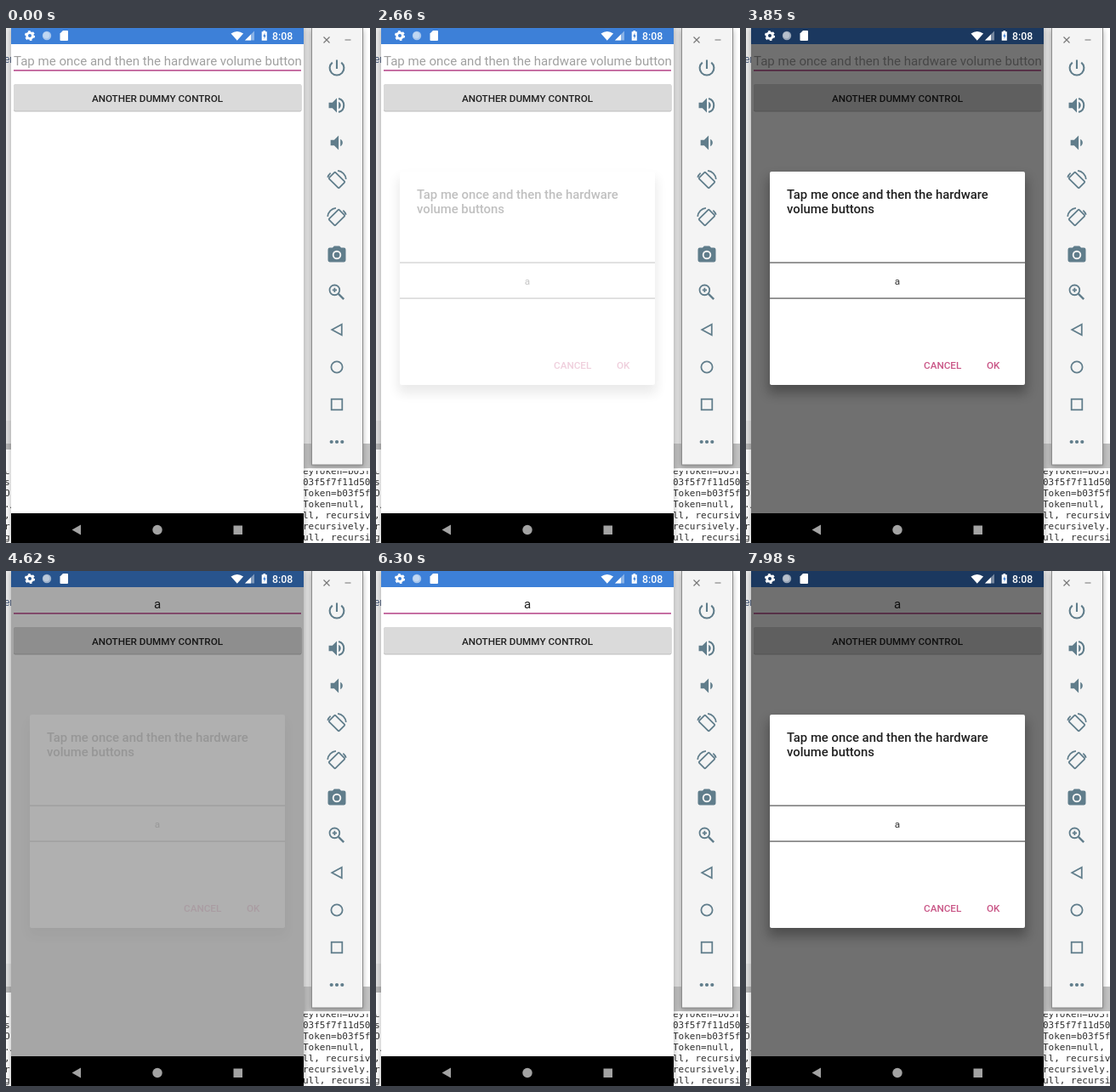
Write an HTML page that moves like this. It is 428 px wide and 606 px high and loops after 8000 ms.

```html
<!DOCTYPE html>
<html lang="en">
<head>
<meta charset="utf-8">
<title>Emulator dialog</title>
<style>
  html, body { margin: 0; width: 100%; height: 100%; overflow: hidden; background: #fff; }
  svg { display: block; width: 428px; height: 606px; }
  text { font-family: Roboto, sans-serif; white-space: pre; }
  .field { font-size: 15.05px; }
  .label { font-size: 11.7px; font-weight: 500; }
  .title { font-size: 14.85px; font-weight: 500; fill: #212121; }
  .accent { fill: #c95586; }
  .log text { font: 11px "DejaVu Sans Mono", monospace; fill: #303030; }
  .line { fill: none; stroke: #607d8b; stroke-width: 1.7; }
  .solid { fill: #607d8b; }
</style>
</head>
<body>
<svg viewBox="0 0 428 606">
  <defs>
    <filter id="soft" x="-20%" y="-20%" width="140%" height="140%"><feGaussianBlur stdDeviation="7"/></filter>
    <filter id="near" x="-30%" y="-10%" width="160%" height="120%"><feGaussianBlur stdDeviation="3"/></filter>
    <clipPath id="fieldClip"><rect x="9" y="20" width="338.5" height="40"/></clipPath>
    <clipPath id="logClip"><rect y="521" width="428" height="85"/></clipPath>
  </defs>

  <!-- Windows behind the emulator -->
  <rect width="428" height="606" fill="#fff"/>
  <rect width="6" height="489" fill="#ececec"/>
  <rect x="350" width="10" height="489" fill="#e6e6e6"/>
  <rect y="462" width="6" height="27" fill="#e0e0e0"/>
  <rect y="489" width="6" height="7" fill="#b8b8b8"/>
  <rect x="350" y="489" width="78" height="29" fill="#c2c2c2"/>
  <text x="-2" y="41" font-size="12" fill="#4a5c7c">er</text>
  <g class="log" id="log" clip-path="url(#logClip)"></g>
  <rect x="4.5" y="0" width="347" height="606" fill="#000" opacity=".22" filter="url(#near)"/>

  <!-- Device screen -->
  <rect x="6" width="344" height="606" fill="#fff"/>
  <rect x="6" width="344" height="19" fill="#3d80d8"/>
  <g clip-path="url(#fieldClip)">
    <text id="hint" class="field" x="9" y="43.5" fill="#a0a0a0">Tap me once and then the hardware volume buttons</text>
  </g>
  <text id="value" class="field" x="178" y="43.5" text-anchor="middle" fill="#222">a</text>
  <rect x="9" y="49" width="338" height="1.8" fill="#c0609a"/>
  <rect x="9" y="66.5" width="338.5" height="32" rx="2" fill="#bdbdbd"/>
  <rect x="9" y="66" width="338.5" height="31.5" rx="2" fill="#dadada"/>
  <text class="label" x="178" y="86.5" text-anchor="middle" fill="#222">ANOTHER DUMMY CONTROL</text>
  <rect id="dim" x="6" width="344" height="571"/>

  <!-- Status icons -->
  <g fill="#fff">
    <circle cx="28" cy="9" r="3.4" fill="none" stroke="#fff" stroke-width="2.8"/>
    <circle cx="28" cy="9" r="5.2" fill="none" stroke="#fff" stroke-width="1.8" stroke-dasharray="2.72"/>
    <circle cx="48" cy="9" r="5.2" opacity=".55"/>
    <circle cx="47.5" cy="8.5" r="3.8" opacity=".3"/>
    <path d="M67 3h5q1 0 1 1v10q0 1-1 1h-7.500q-1 0-1-1V6.500z"/>
    <path d="M264.500 6.500q7.300-5 14.600 0L271.800 14.800z"/>
    <path d="M281 14.500L292 3.500v11z" opacity=".4"/>
    <path d="M281 14.500l7-7v7z"/>
    <path d="M302.500 3h2.500v1.200h1.800v10.600h-6.100V4.200h1.800z"/>
    <text x="313" y="13.500" font-size="12.300" font-weight="500">8:08</text>
  </g>
  <path d="M304.300 5.500l-2 4.500h1.300v3l2-4.500h-1.300z" fill="#3d80d8"/>

  <!-- Dialog -->
  <g id="dialog">
    <rect x="26" y="176" width="304" height="254" fill="#000" opacity=".3" filter="url(#soft)"/>
    <rect x="28" y="169" width="300" height="251" rx="2" fill="#fff"/>
    <text class="title" x="48" y="200.5">Tap me once and then the hardware</text>
    <text class="title" x="48" y="218">volume buttons</text>
    <path d="M28 276.200h300M28 318.200h300" stroke="#888" stroke-width="1.7"/>
    <text x="178" y="302" font-size="11.7" text-anchor="middle" fill="#333">a</text>
    <text class="label accent" x="209" y="401">CANCEL</text>
    <text class="label accent" x="283" y="401">OK</text>
  </g>

  <!-- Navigation bar -->
  <rect x="6" y="571" width="344" height="35"/>
  <g fill="#a3a3a3">
    <path d="M77.500 590.500L88 584.500v12z"/>
    <circle cx="178" cy="590.500" r="5.700"/>
    <rect x="267.500" y="585.500" width="10.500" height="10.500"/>
  </g>

  <!-- Emulator toolbar -->
  <rect x="359" y="2" width="61" height="514" fill="#000" opacity=".3" filter="url(#near)"/>
  <rect x="359.500" y="-4" width="60" height="518" fill="#f4f4f4" stroke="#8c8c8c"/>
  <path d="M373.500 10.500l7 7m0-7l-7 7M398.500 14h7" stroke="#777" stroke-width="1.200"/>
  <g id="tools"></g>
</svg>
<script>
const byId = id => document.getElementById(id);
const svgMarkup = (id, parts) => { byId(id).innerHTML = parts.join(""); };

const leftLog = ["c", "s", "O", "./", ",", "r", "g"];
const rightLog = ["eyToken=b03f", "03f5f7f11d50", "Token=b03f5f", "Token=null, ",
                  "ll, recursiv", "recursively.", "ull, recursi"];
svgMarkup("log", rightLog.map((row, i) => {
  const y = 525 + 13 * i;
  return `<text x="-2" y="${y}">${leftLog[i]}</text><text x="349" y="${y}">${row}</text>`;
}));

const speaker = x => `M${x} 9v6h4l5 5V4l-5 5z`;
const wave = x => `M${x} 8v8c1.500-.7 2.500-2.200 2.500-4s-1-3.300-2.500-4z`;
const rotateIcon = `<rect class="line" x="-8" y="-5" width="16" height="10" rx="1" transform="translate(12 12) rotate(45)"/>
  <path class="line" d="M13 1.500A10.500 10.500 0 0 1 22.300 11M1.700 9A10.500 10.500 0 0 1 5 4" stroke-width="1.500"/>`;

// Each icon sits on a 24-unit grid.
const icons = [
  `<path class="line" stroke-width="2" style="stroke-width:2" d="M12 3v10M7 5.900a8 8 0 1 0 10 0"/>`,
  `<path class="solid" d="${speaker(3)}${wave(14)}"/><path class="line" style="stroke-width:2" d="M14 4.300a8 8 0 0 1 0 15.400"/>`,
  `<path class="solid" d="${speaker(5)}${wave(16)}"/>`,
  rotateIcon,
  `<g transform="matrix(-1 0 0 1 24 0)">${rotateIcon}</g>`,
  `<path class="solid" fill-rule="evenodd" d="M9 2L7.200 4H4q-2 0-2 2v12q0 2 2 2h16q2 0 2-2V6q0-2-2-2h-3.200L15 2zM7 12a5 5 0 0 1 10 0a5 5 0 0 1-10 0z"/><circle class="solid" cx="12" cy="12" r="3.200"/>`,
  `<circle class="line" cx="9.500" cy="9.500" r="5.600"/><path class="line" d="M7 9.500h5M9.500 7v5"/><path class="line" style="stroke-width:2.300" d="M13.800 13.800l6 6"/>`,
  `<path class="line" d="M6.500 12L17.500 6v12z"/>`,
  `<circle class="line" cx="12" cy="12" r="6.300"/>`,
  `<rect class="line" x="6" y="6" width="12" height="12"/>`,
  [6, 12, 18].map(x => `<circle class="solid" cx="${x}" cy="12" r="2"/>`).join("")
];
svgMarkup("tools", icons.map((icon, i) =>
  `<g transform="translate(389 ${47 + 44 * i}) scale(1.050) translate(-12 -12)">${icon}</g>`));

const LOOP = 8000, TICK = 70, CLOSE = 4480, REOPEN_SHIFT = 4270;
const opening = {
  dialog: [[2590, 0], [2660, .28], [2730, .92], [2800, 1]],
  dim: [[2660, 0], [2730, .13], [2940, .56]]
};
const closing = {
  dialog: [[4480, 1], [4550, .55], [4620, .11], [4690, 0]],
  dim: [[4480, .56], [4550, .48], [4620, .35], [4690, .16], [4760, .025], [4830, 0]]
};

function sample(keys, t) {
  if (t <= keys[0][0]) return keys[0][1];
  for (let i = 1; i < keys.length; i++) {
    const [t0, v0] = keys[i - 1], [t1, v1] = keys[i];
    if (t <= t1) return v0 + (v1 - v0) * (t - t0) / (t1 - t0);
  }
  return keys[keys.length - 1][1];
}

function level(part, t) {
  if (t < CLOSE) return sample(opening[part], t);
  if (t < 6000) return sample(closing[part], t);
  return sample(opening[part], t - REOPEN_SHIFT);
}

function draw(now) {
  const t = Math.floor(now % LOOP / TICK) * TICK;
  const filled = t > CLOSE;
  byId("hint").setAttribute("opacity", filled ? 0 : 1);
  byId("value").setAttribute("opacity", filled ? 1 : 0);
  for (const part of ["dialog", "dim"]) byId(part).setAttribute("opacity", level(part, t));
}

const start = performance.now();
function loop() {
  draw(performance.now() - start);
  requestAnimationFrame(loop);
}
loop();
</script>
</body>
</html>
```
